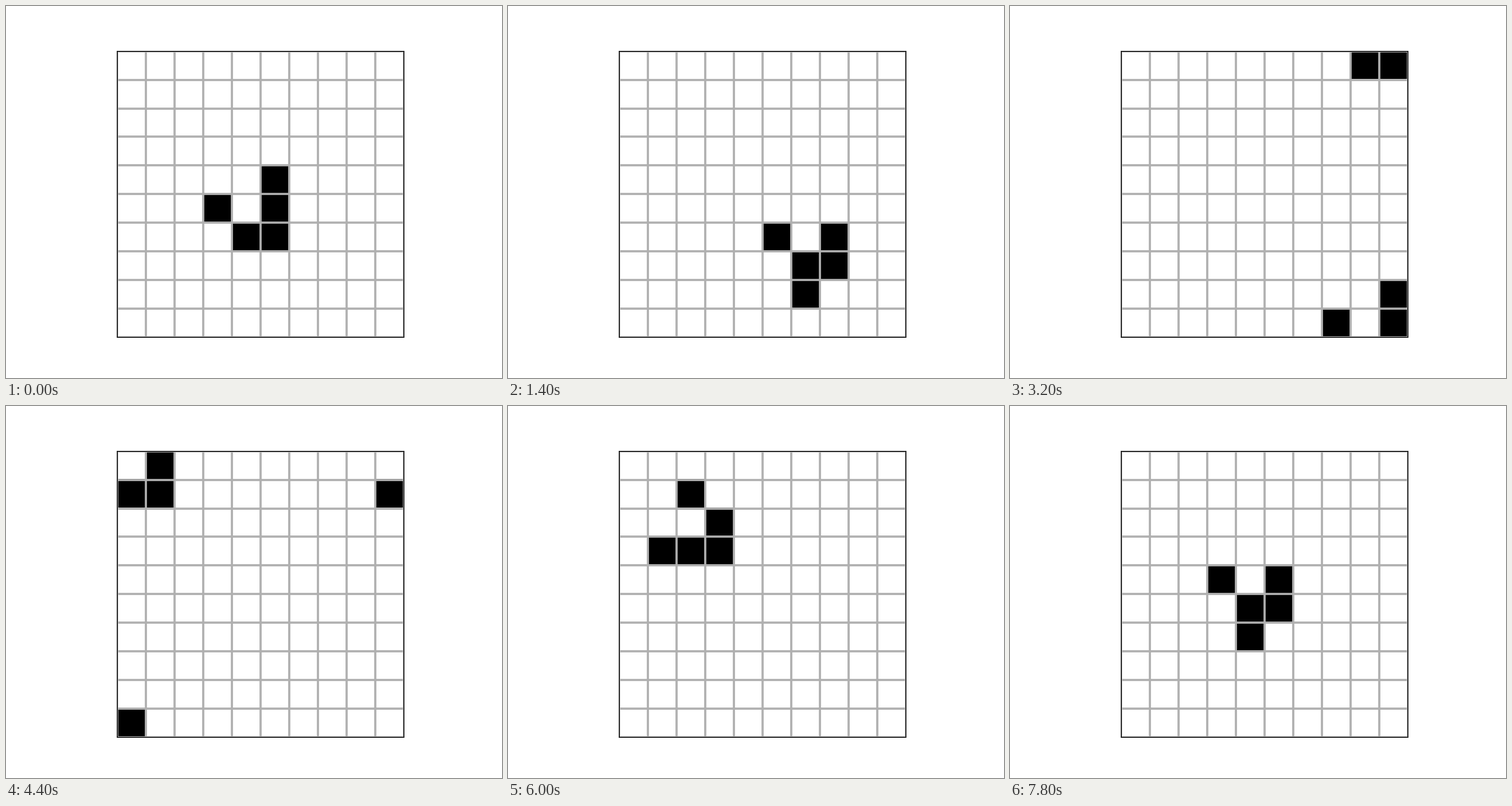
A matplotlib script that plays this animation: 640 px wide and 480 px high, repeating every 8 s.

```python
import numpy as np
import matplotlib.pyplot as plt
from matplotlib.animation import FuncAnimation

SIZE = 10
FRAMES = 40
INTERVAL = 200
GLIDER = [(4, 5), (5, 3), (5, 5), (6, 4), (6, 5)]


def step(grid):
    """One Game of Life generation on a torus."""
    around = sum(
        np.roll(grid, (dy, dx), (0, 1))
        for dy in (-1, 0, 1)
        for dx in (-1, 0, 1)
        if (dy, dx) != (0, 0)
    )
    return ((around == 3) | ((grid == 1) & (around == 2))).astype(int)


start = np.zeros((SIZE, SIZE), int)
start[tuple(zip(*GLIDER))] = 1
generations = [start]
for _ in range(FRAMES - 1):
    generations.append(step(generations[-1]))

fig, ax = plt.subplots(figsize=(6.4, 4.8), dpi=100)
image = ax.imshow(start, cmap="binary", vmin=0, vmax=1, interpolation="nearest")
edges = np.arange(-0.5, SIZE, 1)
ax.set_xticks(edges)
ax.set_yticks(edges)
ax.tick_params(length=0, labelbottom=False, labelleft=False)
ax.grid(color="#b0b0b0", linewidth=2)


def update(i):
    image.set_data(generations[i])
    return (image,)


anim = FuncAnimation(fig, update, frames=FRAMES, interval=INTERVAL,
                     repeat=True, repeat_delay=0)
plt.show()
```
